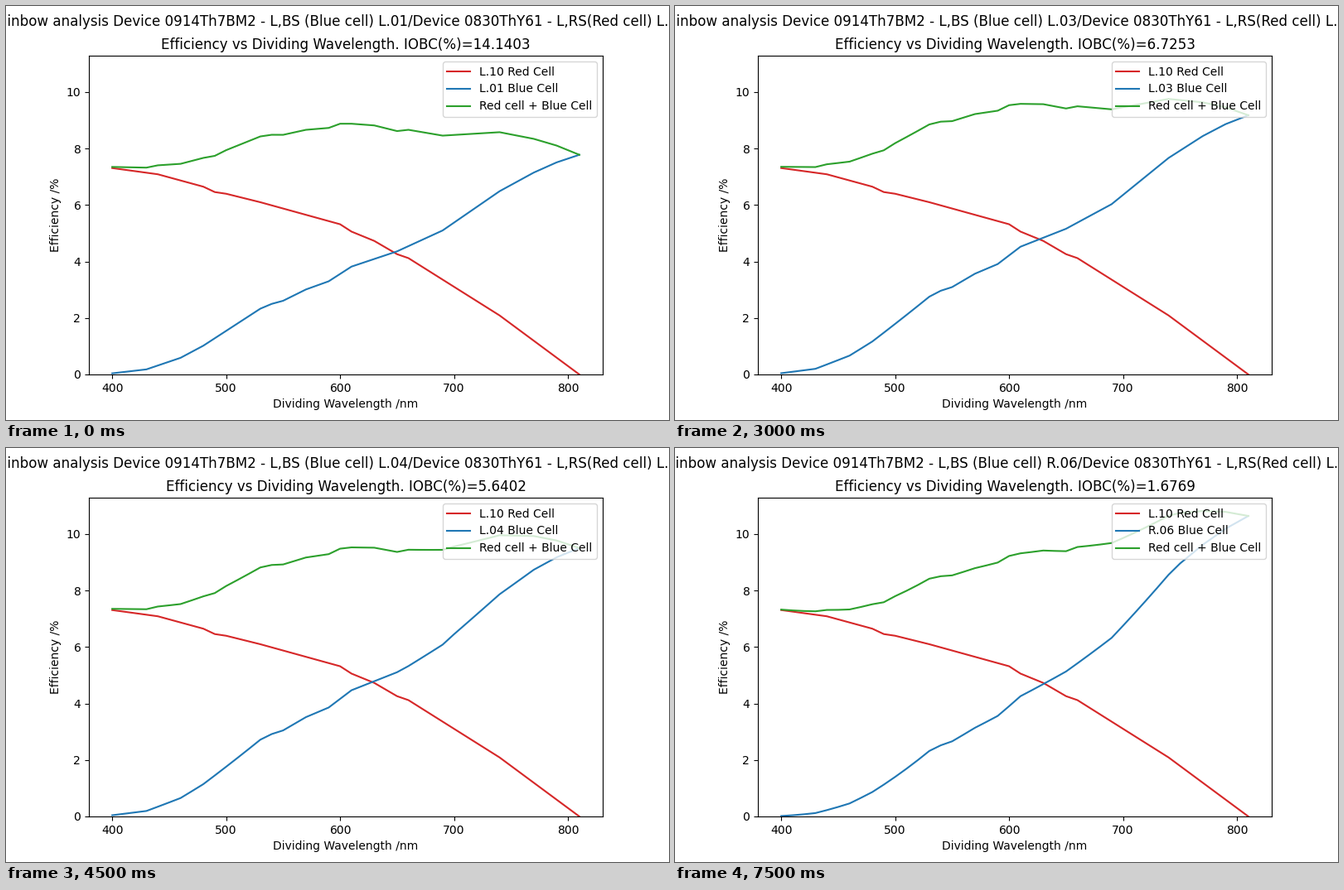
Write a matplotlib script that moves like this. It is 800 by 500 pixels and loops after 8 s.

```python
import numpy as np
import matplotlib.pyplot as plt
from matplotlib.animation import FuncAnimation

STEP_MS = 500
STEPS_PER_CELL = 3
LOOP_STEPS = 16

wave = np.arange(400, 811, 10)


def through(*points):
    return np.interp(wave, *zip(*points))


red = through((400, 7.31), (440, 7.09), (480, 6.65), (490, 6.46), (500, 6.40),
              (530, 6.10), (600, 5.32), (610, 5.06), (630, 4.73), (650, 4.26),
              (660, 4.12), (740, 2.09), (810, 0))

base = through((400, 0.04), (430, 0.18), (460, 0.59), (480, 1.02), (530, 2.33),
               (540, 2.50), (550, 2.61), (570, 3.01), (590, 3.30), (610, 3.82),
               (650, 4.36), (690, 5.10), (740, 6.49), (770, 7.15), (790, 7.51),
               (810, 7.78))

# Every blue cell is the base curve times its own gain over wavelength.
cells = [
    ("L.01", "14.1403", 1),
    ("L.02", "4.7631", through(
        (400, 0.2), (450, 0.97), (460, 0.64), (470, 0.73), (480, 1.09),
        (520, 1.15), (530, 1.03), (600, 1.095), (680, 1.13), (690, 1.20),
        (730, 1.19), (740, 1.15), (780, 1.16), (790, 1.20))),
    ("L.03", "6.7253", through((430, 1.11), (535, 1.186), (810, 1.18))),
    ("L.04", "5.6402", through(
        (430, 1.08), (530, 1.167), (660, 1.172), (700, 1.20), (770, 1.222))),
    ("R.05", "0.0006", 0.0205),
    ("R.06", "1.6769", through(
        (400, 0.4), (430, 0.67), (470, 0.82), (530, 0.996), (570, 1.043),
        (610, 1.115), (700, 1.256), (750, 1.335), (810, 1.368))),
]

plt.rcParams["font.family"] = "DejaVu Sans"
# A fine horizontal hinting grid keeps the natural letter spacing.
plt.rcParams["text.hinting_factor"] = 64

fig, ax = plt.subplots(figsize=(8, 5), dpi=100)
fig.subplots_adjust(left=0.125, right=0.9, bottom=0.11, top=0.88)


def draw(step):
    name, iobc, gain = cells[step // STEPS_PER_CELL]
    blue = base * gain
    ax.clear()
    ax.plot(wave, red, color="tab:red", label="L.10 Red Cell")
    ax.plot(wave, blue, color="tab:blue", label=f"{name} Blue Cell")
    ax.plot(wave, red + blue, color="tab:green", label="Red cell + Blue Cell")
    ax.set_xlim(379.5, 830.5)
    ax.set_ylim(0, 11.29)
    ax.set_xlabel("Dividing Wavelength /nm")
    ax.set_ylabel("Efficiency /%")
    ax.set_title(f"Efficiency vs Dividing Wavelength. IOBC(%)={iobc}")
    ax.legend(loc="upper right")
    fig.suptitle(f"Rainbow analysis Device 0914Th7BM2 - L,BS (Blue cell) {name}"
                 "/Device 0830ThY61 - L,RS(Red cell) L.10")
    return []


anim = FuncAnimation(fig, draw, frames=LOOP_STEPS, init_func=lambda: draw(0),
                     interval=STEP_MS, repeat=True, repeat_delay=0)
plt.show()
```
